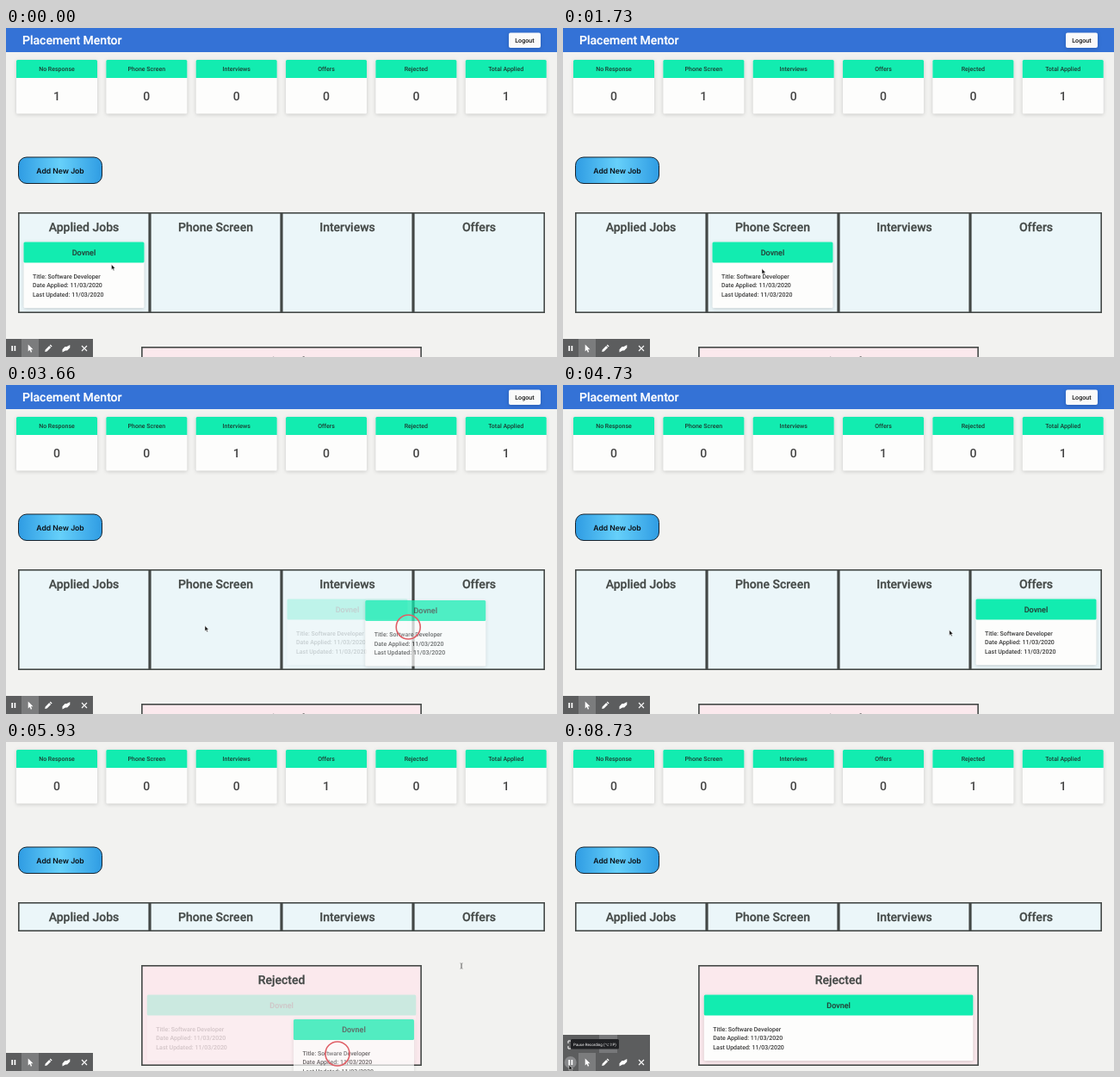
Animation of 640x382 px, one loop 8800 ms. Source, as an HTML page:

```html
<!DOCTYPE html>
<html lang="en">
<head>
<meta charset="utf-8">
<title>Job board</title>
<style>
  html, body { margin: 0; height: 100%; overflow: hidden; background: #f2f2f0; }
  svg { display: block; width: 100vw; height: 100vh; }
  text { font-family: Roboto, Arial, sans-serif; font-weight: 500; text-rendering: geometricPrecision; white-space: pre; }
  .mid { text-anchor: middle; }
  .head { font-size: 14px; fill: #434846; stroke: #434846; stroke-width: .25; }
  .count { font-size: 14px; fill: #444; }
  .label { font-size: 7px; fill: #1c3a31; }
  .company { font-size: 9px; fill: #24443a; stroke: #24443a; stroke-width: .15; }
  .line { font-size: 7px; fill: #383838; }
  .card { filter: drop-shadow(0 1.5px 2px rgba(0, 0, 0, .17)); }
  .box { stroke: #434846; stroke-width: 1.6; }
</style>
</head>
<body>
<svg id="stage" viewBox="0 0 640 382" preserveAspectRatio="none">
  <defs>
    <linearGradient id="blue">
      <stop offset="0" stop-color="#2f9ce3"/>
      <stop offset=".5" stop-color="#66d0fa"/>
      <stop offset="1" stop-color="#2f9ce3"/>
    </linearGradient>
  </defs>
  <rect width="640" height="382" fill="#f2f2f0"/>
  <g id="page">
    <rect width="640" height="28" fill="#3472d6"/>
    <text x="19" y="19" font-size="14" fill="#fff" stroke="#fff" stroke-width=".2">Placement Mentor</text>
    <rect x="584" y="5.5" width="37" height="17.5" rx="2" fill="#fafafa" class="card"/>
    <text x="602.4" y="16.7" class="mid" font-size="7.1" fill="#111">Logout</text>
    <g id="stats"></g>
    <rect x="14.5" y="150" width="97" height="30.5" rx="9.5" fill="url(#blue)" stroke="#17222c"/>
    <text x="63" y="168.5" class="mid" style="font:600 8.6px Inter, Arial, sans-serif" fill="#0b0f14">Add New Job</text>
    <g id="columns"></g>
    <rect id="rejected" class="box" x="157.9" width="324.2" fill="#fbe9ed"/>
    <text id="rejectedHead" class="mid head" x="320">Rejected</text>
  </g>
  <g id="home"></g>
  <g id="dragged" opacity=".72"></g>
  <circle id="ring" r="14" fill="#fff" fill-opacity=".12" stroke="#df5f66" stroke-width="1.6"/>
  <g id="bar">
    <rect id="panel" width="101" fill="#5c5d5e"/>
    <rect x="18" y="361" width="20" height="21" fill="#7b7c7d"/>
    <g id="hover">
      <rect x="42" y="340" width="21" height="21" fill="#77787a"/>
      <path d="M6 350v-3h3M6 353v3h3" fill="none" stroke="#fff"/>
      <circle cx="8.7" cy="372" r="7" fill="#88898b"/>
    </g>
    <path d="M7.2 369v6M10.4 369v6" stroke="#fff" stroke-width="1.7"/>
    <path d="M25.7 367.5v8l1.9-1.8 1.3 3 1.3-.6-1.3-2.9h2.6z" fill="#fff"/>
    <path d="M45.2 376l.5-2.4 4.5-4.5 1.9 1.9-4.5 4.5zM50.8 368.5l.9-.9 1.9 1.9-.9.9z" fill="#fff"/>
    <path d="M65.5 373.2l3-3.2h2l3.8-2v3.2l-3.2 3.4h-2l-3.6 2z" fill="#fff"/>
    <path d="M88 369l6 6m0-6l-6 6" stroke="#fff" stroke-width="1.1"/>
    <g id="tooltip">
      <rect x="9" y="345" width="56" height="11.5" rx="1.5" fill="#202124"/>
      <text x="37" y="352.5" class="mid" fill="#fff" style="font:4.5px Roboto, 'DejaVu Sans', sans-serif">Pause Recording (⌥⇧P)</text>
    </g>
  </g>
  <path id="arrow" d="M0 0v6.2l1.4-1.2 1 2.2 1.1-.5-1-2.1h1.9z" fill="#111" stroke="#fff" stroke-width=".5"/>
  <path id="beam" d="M-1.5-3.2q1.5 0 1.5 1v4.400q0 1-1.500 1M1.500-3.200q-1.500 0-1.500 1v4.400q0 1 1.500 1" fill="none" stroke="#777" stroke-width=".8"/>
</svg>
<script>
const LOOP = 8800, REJECTED = 4, MINT = '#12ecb0';
const COLUMN_TOP = 214, COLUMN_PITCH = 153, EMPTY = 34, FILLED = 117;
const $ = id => document.getElementById(id);

function set(el, attrs) {
  for (const name in attrs) el.setAttribute(name, attrs[name]);
  return el;
}
function add(parent, tag, attrs, content = '') {
  const el = document.createElementNS('http://www.w3.org/2000/svg', tag);
  el.textContent = content;
  parent.appendChild(el);
  return set(el, attrs);
}
const show = (el, on) => set(el, { visibility: on ? 'visible' : 'hidden' });
const move = (el, x, y) => set(el, { transform: `translate(${x} ${y})` });

const counts = ['No Response', 'Phone Screen', 'Interviews', 'Offers', 'Rejected', 'Total Applied'].map((label, i) => {
  const x = 12 + 104.35 * i, mid = x + 47;
  add($('stats'), 'rect', { x, y: 37, width: 94, height: 62.5, rx: 1.5, fill: '#fdfdfc', class: 'card' });
  add($('stats'), 'path', { d: `M${x} 58V38.5q0-1.500 1.500-1.500h91q1.500 0 1.500 1.500V58z`, fill: MINT });
  add($('stats'), 'text', { x: mid, y: 49.6, class: 'mid label' }, label);
  return add($('stats'), 'text', { x: mid, y: 83.6, class: 'mid count' }, '1');
});

const columns = ['Applied Jobs', 'Phone Screen', 'Interviews', 'Offers'].map((label, i) => {
  const x = 14 + COLUMN_PITCH * i;
  const box = add($('columns'), 'rect', { x: x + .8, y: COLUMN_TOP + .8, width: COLUMN_PITCH - 1.6, class: 'box', fill: '#ebf6f9' });
  add($('columns'), 'text', { x: x + 76.5, y: 236, class: 'mid head' }, label);
  return box;
});

function makeCard(group) {
  const body = add(group, 'rect', { height: 76.5, rx: 1.5, fill: '#fdfdfc', class: 'card' });
  const top = add(group, 'rect', { height: 24, rx: 1.5, fill: MINT });
  const name = add(group, 'text', { y: 15, class: 'mid company' }, 'Dovnel');
  ['Title: Software Developer', 'Date Applied: 11/03/2020', 'Last Updated: 11/03/2020'].forEach((text, i) =>
    add(group, 'text', { x: 10.5, y: 42 + 10.5 * i, class: 'line' }, text));
  return width => {
    set(body, { width });
    set(top, { width });
    set(name, { x: width / 2 });
  };
}
const sizeHome = makeCard($('home'));
makeCard($('dragged'))(140);

// Pointer paths hold [time, x, y]; grab is the pointer's offset inside the card.
const drags = [
  { grab: [91, 31], path: [[350, 111, 280], [930, 200, 279], [1180, 243, 280], [1280, 243, 280]] },
  { grab: [67, 31], path: [[1900, 240.5, 280], [2460, 374, 280], [2650, 392, 280], [2750, 392, 280]] },
  { grab: [50, 31], path: [[3250, 376.5, 280], [3660, 467, 281], [3950, 532, 281], [4080, 532, 281]] },
  { grab: [51, 40], path: [[5180, 530.5, 261], [5480, 470, 350], [5930, 385, 362], [6250, 372, 340], [6450, 372, 338]] }
];
const cursorPath = [
  [0, 122.5, 274.5], [300, 111, 279], [1280, 111, 279], [1281, 243, 280], [1600, 231, 279.5],
  [4080, 231, 279.5], [4081, 532, 282], [4450, 448.5, 284.5], [4730, 448.5, 284.5], [5100, 529, 260],
  [6450, 529, 260], [6451, 372, 338], [7330, 372, 338], [8150, 7, 375]
];

function along(path, t) {
  let i = path.findIndex(key => key[0] > t);
  if (i < 0) i = path.length;
  if (i === 0) return path[0].slice(1);
  if (i === path.length) return path[i - 1].slice(1);
  const [t0, x0, y0] = path[i - 1], [t1, x1, y1] = path[i];
  const k = (t - t0) / (t1 - t0);
  return [x0 + (x1 - x0) * k, y0 + (y1 - y0) * k];
}
function smooth(t, from, to) {
  const k = Math.min(1, Math.max(0, (t - from) / (to - from)));
  return k * k * (3 - 2 * k);
}
const listAt = (x, y) => y > 343 ? REJECTED : Math.min(3, Math.floor((x - 14) / COLUMN_PITCH));

function render(t) {
  const scroll = 28 * smooth(t, 4800, 5020);
  const dropped = drags.filter(d => t >= d.path.at(-1)[0]).length;
  const drag = drags.find(d => t >= d.path[0][0] && t < d.path.at(-1)[0]);
  const pointer = drag && along(drag.path, t);
  let list = dropped;
  if (drag) {
    const reached = drag === drags[3] && t > drag.path[1][0];
    list = reached ? REJECTED : listAt(...pointer);
  }
  const rejected = list === REJECTED;
  const columnHeight = rejected ? EMPTY : FILLED;
  const rejectedTop = COLUMN_TOP + columnHeight + 40;

  move($('page'), 0, -scroll);
  counts.forEach((el, i) => { el.textContent = i === 5 || i === dropped ? '1' : '0'; });
  columns.forEach(el => set(el, { height: columnHeight - 1.6 }));
  set($('rejected'), { y: rejectedTop - .2, height: (rejected ? FILLED : EMPTY) - 1.6 });
  set($('rejectedHead'), { y: rejectedTop + 21 });

  sizeHome(rejected ? 312.5 : 140);
  move($('home'), rejected ? 163.8 : 20.5 + COLUMN_PITCH * list, (rejected ? rejectedTop + 33.5 : 248.6) - scroll);
  set($('home'), { opacity: drag ? .2 : 1 });

  show($('dragged'), drag);
  show($('ring'), drag);
  if (drag) {
    move($('dragged'), pointer[0] - drag.grab[0], pointer[1] - drag.grab[1]);
    move($('ring'), ...pointer);
  }

  const open = t >= 8200;
  set($('panel'), { y: open ? 340 : 361, height: open ? 42 : 21 });
  show($('hover'), open);
  show($('tooltip'), t >= 8660);

  const cursor = along(cursorPath, t), overText = t >= 5060 && t < 6450;
  move($('arrow'), ...cursor);
  move($('beam'), ...cursor);
  show($('arrow'), !overText);
  show($('beam'), overText);
}

const start = performance.now();
function tick() {
  render((performance.now() - start) % LOOP);
  requestAnimationFrame(tick);
}
tick();
</script>
</body>
</html>
```
